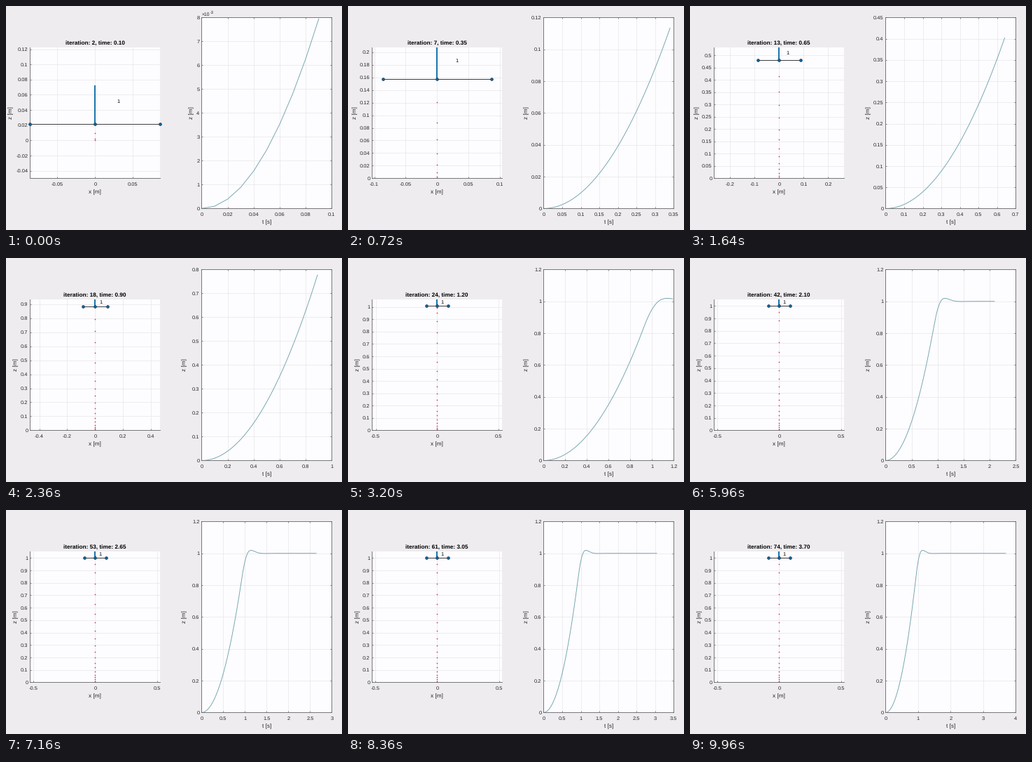
A matplotlib script for the animation above (10000 ms loop, 480 by 319 pixels).

```python
import math

import matplotlib.pyplot as plt
import numpy as np
from matplotlib.animation import FuncAnimation

W, H, DPI = 480, 319, 64
PX = 72 / DPI               # one pixel in points
TICK, LABEL = 7.45, 8.2     # font sizes in pixels
ARM, MAST = 0.086, 0.05
STEP = 0.05                 # control period in seconds
INK, GREY, GRID = "#262626", "#6c6c70", "#e9e9ec"

plt.rcParams["font.family"] = "Liberation Sans"
plt.rcParams["text.hinting"] = "none"


def climb(t_end, kp=187.0, kv=18.95, g=9.81, dt=0.001):
    """Height under a PD controller with limited thrust, every 10 ms."""
    z = v = 0.0
    out = []
    for i in range(round(t_end / dt) + 1):
        if i % 10 == 0:
            out.append(z)
        a = min(max(kp * (1 - z) - kv * v, -g), 0.2 * g)
        z += v * dt + a * dt * dt / 2
        v += a * dt
    return np.array(out)


Z = climb(3.9)
T = np.arange(len(Z)) * 0.01

# when (ms) the running iteration number reaches a value
CLOCK = [-60, 690, 1600, 3170, 3320, 4260, 5560, 5720, 6200, 6360, 7160,
         7380, 7640, 8160, 8360, 9200, 9360, 9520, 9960]
ITERS = [2, 7, 13, 24, 25, 31, 39, 40, 44, 45, 53,
         54, 55, 60, 61, 68, 69, 70, 74]


def nice_step(span, most):
    """Smallest 1-2-5 step that needs at most the given number of intervals."""
    for e in range(-4, 2):
        for m in (1, 2, 5):
            step = m * 10.0 ** e
            if math.ceil(span / step - 1e-6) <= most:
                return step


def ticks(lo, hi, step):
    first = math.ceil(lo / step - 1e-6)
    last = math.floor(hi / step + 1e-6)
    return [round(k * step, 6) for k in range(first, last + 1)]


def names(values, scale=1):
    return [f"{v * scale:g}" for v in values]


def width(label):
    em = {".": 0.278, "-": 0.333}
    return TICK * sum(em.get(c, 0.556) for c in label)


def set_axes(ax, xlim, ylim, xt, yt, ylabels):
    ax.set_xticks(xt, names(xt))
    ax.set_yticks(yt, ylabels)
    ax.set_xlim(*xlim)
    ax.set_ylim(*ylim)


def add_axes(x0, y0, x1, y1, box):
    ax = fig.add_axes([x0 / W, 1 - y1 / H, (x1 - x0) / W, (y1 - y0) / H],
                      facecolor="#fdfcfe")
    ax.set_axisbelow(True)
    ax.grid(color=GRID, lw=0.8 * PX)
    ax.tick_params(direction="in", length=2 * PX, width=0.8 * PX, color=GREY,
                   labelsize=TICK * PX, labelcolor=INK, top=box, right=box)
    ax.tick_params(axis="x", pad=5.5 * PX)
    ax.tick_params(axis="y", pad=3 * PX)
    for side, spine in ax.spines.items():
        spine.set(color=GREY, linewidth=0.9 * PX)
        spine.set_visible(box or side in ("left", "bottom"))
    return ax


def write(x, y, s, size=LABEL, **kw):
    kw = {"ha": "center", "va": "baseline", "color": INK, **kw}
    return fig.text(x / W, 1 - y / H, s, fontsize=size * PX, **kw)


fig = plt.figure(figsize=(W / DPI, H / DPI), dpi=DPI, facecolor="#eeecef")
left = add_axes(34.4, 59.4, 220.4, 245.4, False)
right = add_axes(279.4, 16.4, 465.4, 288.4, True)

title = write(127.2, 56, "", weight="bold", color="black")
write(127.2, 267.5, "x [m]")
write(372.3, 310, "t [s]")
zl_left = write(8, 152.5, "z [m]", rotation=90, va="center")
zl_right = write(265, 152.5, "z [m]", rotation=90, va="center")
power = [write(279.5, 14.3, "×10", 6.8, ha="left"),
         write(292, 11.2, "-3", 5.5, ha="left")]

trail, = left.plot([], [], "o", ms=1.7 * PX, mew=0, color="#d43a52")
arm, = left.plot([], [], color="#2a2a2c", lw=0.9 * PX)
mast, = left.plot([], [], color="#1a74ae", lw=2 * PX, solid_capstyle="butt")
rotors, = left.plot([], [], "o", ms=3.7 * PX, mfc="#0c64a0", mec="#1c3f5a",
                    mew=0.8 * PX, clip_on=False, zorder=5, snap=False)
tag = left.text(0, 0, "1", fontsize=TICK * PX, va="center", color="black")
curve, = right.plot([], [], color="#6fa3ab", lw=0.9 * PX)


def draw_scene(n):
    z = Z[5 * (n + 1)]
    top = z + MAST
    span = max(2 * ARM, top)
    lo = (top - span) / 2
    hi = lo + span
    xstep = next(s for limit, s in ((0.27, 0.05), (0.54, 0.1), (1, 0.2), (9, 0.5))
                 if span < limit)
    zt = ticks(lo, hi, nice_step(span, 11))
    labels = names(zt)
    half = span / 2
    set_axes(left, (-half, half), (lo, hi), ticks(-half, half, xstep), zt, labels)
    zl_left.set_x((24.6 - max(map(width, labels))) / W)

    past = Z[:5 * n + 1:5]
    trail.set_data(np.zeros(len(past)), past)
    arm.set_data([-ARM, ARM], [z, z])
    mast.set_data([0, 0], [z, top])
    rotors.set_data([-ARM, 0, ARM], [z] * 3)
    tag.set_position((ARM / 3, z + ARM / 3))


def draw_chart(n):
    count = 5 * n
    t, z = T[:count], Z[:count]
    xstep = nice_step(t[-1], 7)
    zstep = nice_step(z.max(), 10)
    xmax = math.ceil(t[-1] / xstep - 1e-6) * xstep
    zmax = math.ceil(z.max() / zstep - 1e-6) * zstep
    tiny = zmax < 0.0099
    zt = ticks(0, zmax, zstep)
    labels = names(zt, 1000 if tiny else 1)
    set_axes(right, (0, xmax), (0, zmax), ticks(0, xmax, xstep), zt, labels)
    for part in power:
        part.set_visible(tiny)
    room = max(map(width, labels))
    if not tiny:
        room = max(room, width("0.00"))
    zl_right.set_x((269.6 - room) / W)
    curve.set_data(t, z)


def update(i):
    n = int(np.interp(i * 40, CLOCK, ITERS) + 1e-6)
    title.set_text(f"iteration: {n}, time: {n * STEP:.2f}")
    draw_scene(n)
    draw_chart(n)
    return []


anim = FuncAnimation(fig, update, frames=250, interval=40, repeat=True,
                     repeat_delay=0, init_func=lambda: update(0), blit=False)
plt.show()
```
